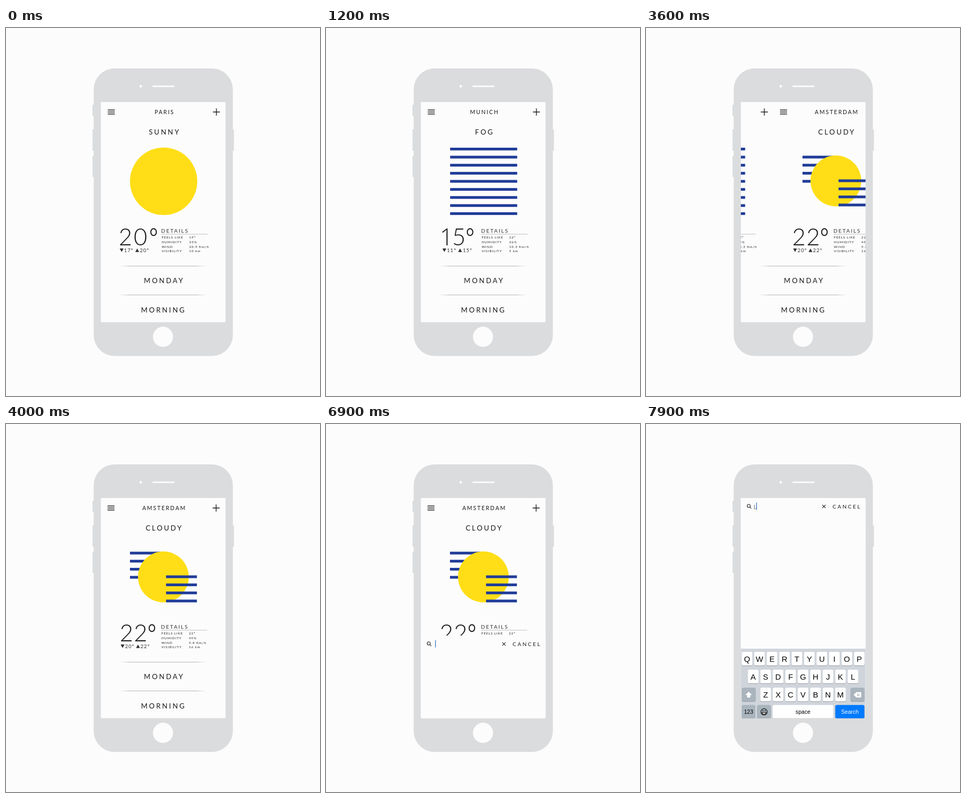
An HTML page that plays this animation: 600 px wide and 701 px high, repeating every 8000 ms.

```html
<!DOCTYPE html>
<html lang="en">
<head>
<meta charset="utf-8">
<title>Weather app</title>
<style>
  html, body { margin: 0; width: 100%; height: 100%; overflow: hidden; background: #fcfcfc; }
  svg { display: block; width: 100%; height: 100%; }
  text { font-family: Lato, "Open Sans", sans-serif; fill: #1a1a1a; white-space: pre; }
  .mid { text-anchor: middle; }
  .city { font-size: 10.5px; letter-spacing: 2px; }
  .title { font-size: 13.3px; letter-spacing: 3px; }
  .temp { font-size: 44.5px; font-weight: 300; }
  .one { font-family: "Open Sans", sans-serif; }
  .range { font-size: 9.6px; letter-spacing: 1px; fill: #333; }
  .head { font-size: 10px; letter-spacing: 2px; fill: #333; }
  .row { font-size: 6.3px; letter-spacing: .95px; fill: #222; }
  .cancel { font-size: 10.2px; letter-spacing: 2.6px; }
  .typed { font-size: 12.5px; font-weight: 300; }
  .key { font: 15px "Liberation Sans", Arial, sans-serif; text-anchor: middle; fill: #000; }
  .small { font-size: 10.6px; }
  .line { fill: none; stroke: #1a1a1a; stroke-width: 1.4; }
  .thin { stroke-width: 1.05; }
  .paper { fill: #fcfcfc; }
  .grey { fill: #dbdcde; }
  .sun { fill: #ffde17; }
  .bar { fill: #203c98; }
</style>
</head>
<body>
<svg viewBox="0 0 600 701">
  <defs>
    <clipPath id="screen"><rect x="181.3" y="141" width="238.2" height="419.6" rx="1.5"/></clipPath>
    <linearGradient id="fade">
      <stop offset="0" stop-color="#b4b4b4" stop-opacity="0"/>
      <stop offset=".12" stop-color="#b4b4b4"/>
      <stop offset=".88" stop-color="#b4b4b4"/>
      <stop offset="1" stop-color="#b4b4b4" stop-opacity="0"/>
    </linearGradient>
  </defs>

  <g class="grey">
    <rect x="165.3" y="146" width="5" height="22" rx="1"/>
    <rect x="165.3" y="193" width="5" height="41" rx="1"/>
    <rect x="165.3" y="243" width="5" height="40.5" rx="1"/>
    <rect x="430.5" y="193" width="5" height="41" rx="1"/>
    <rect x="167.5" y="77" width="266" height="547.7" rx="40"/>
  </g>
  <g class="paper">
    <circle cx="257.5" cy="111" r="2.5"/>
    <rect x="280" y="109.4" width="42" height="3.1" rx=".6"/>
    <circle cx="300" cy="588.3" r="19.2"/>
    <rect x="181.3" y="141" width="238.2" height="419.6" rx="1.5"/>
  </g>

  <g clip-path="url(#screen)">
    <g id="pages"></g>
    <g fill="url(#fade)">
      <rect x="217" y="453" width="166" height="1"/>
      <rect x="217" y="508" width="166" height="1"/>
    </g>
    <text class="title mid" x="302.3" y="486.4">MONDAY</text>
    <text class="title mid" x="301" y="541.5">MORNING</text>
    <circle id="tap" cx="402" cy="160" r="10" fill="#f0282d"/>

    <g id="panel">
      <rect class="paper" x="181" y="141" width="239" height="421"/>
      <g class="line thin">
        <circle cx="196.3" cy="155.9" r="3"/>
        <path d="M198.4 158.1l2.8 2.9M336.9 153.9l6.2 6.2M343.1 153.9l-6.2 6.2"/>
      </g>
      <text class="cancel" x="356.6" y="160.7">CANCEL</text>
      <text class="typed" id="typed" x="205.6" y="161.7">L</text>
      <rect id="caret" y="149.6" width="1.4" height="14" fill="#4a80c4"/>
    </g>
    <g id="keyboard"></g>
  </g>
</svg>

<script>
const $ = id => document.getElementById(id);
const PITCH = 238, LOOP = 8000, FRAME = 100;

const text = (cls, x, y, s) => `<text class="${cls}" x="${x}" y="${y}">${s}</text>`;
const rect = (cls, x, y, w, h) => `<rect class="${cls}" x="${x}" y="${y}" width="${w}" height="${h}"/>`;
const disc = (y, r) => `<circle class="sun" cx="301.2" cy="${y}" r="${r}"/>`;
const bars = (n, x, y, w) =>
  Array.from({ length: n }, (_, i) => rect("bar", x, y + i * 15.37, w, 5.2)).join("");

// tx: digit positions, deg: centre of the degree ring, rx: low mark, low text, high mark, high text
const places = [
  { city: "PARIS", sky: "SUNNY", art: disc(292, 64.3),
    temp: "20", tx: [215.3, 244], deg: 282, low: 17, high: 20, rx: [217.3, 225.6, 247, 255.8],
    facts: ["19°", "33%", "20.9 Km/h", "10 km"] },
  { city: "MUNICH", sky: "FOG", art: bars(9, 237.2, 228, 128.1),
    temp: "15", tx: [217.5, 241], deg: 275.3, low: 11, high: 15, rx: [222.5, 231, 252.5, 261.5],
    facts: ["22°", "36%", "10.3 Km/h", "5 km"] },
  { city: "AMSTERDAM", sky: "CLOUDY",
    art: bars(4, 237.4, 243.3, 59) + disc(291.2, 48.5) + bars(4, 306.3, 288.4, 59),
    temp: "22", tx: [217.7, 244.8], deg: 279.3, low: 20, high: 22, rx: [219.5, 228, 249, 257.5],
    facts: ["22°", "49%", "9.8 Km/h", "16 km"] }
];
const labels = ["FEELS LIKE", "HUMIDITY", "WIND", "VISIBILITY"];

function page(p, i) {
  const left = i * PITCH - (i === 2 ? .5 : 0);
  const [a, b, c, d] = p.rx;
  const digits = [...p.temp].map((n, k) =>
    text("temp" + (n === "1" ? " one" : ""), p.tx[k], 414, n)).join("");
  const rows = labels.map((s, k) => {
    const y = 401.3 + k * 8.6;
    return text("row", 297.4, y, s) + text("row", 350, y, p.facts[k]);
  }).join("");
  return `<g transform="translate(${left})">
    <path class="line" d="M194.4 156.3h13.5M194.4 160h13.5M194.4 163.8h13.5M395.3 160h13.4M402 153.3v13.4"/>
    ${text("city mid", 303, 163.7, p.city)}${text("title mid", 303.2, 203, p.sky)}
    ${p.art}${digits}
    <ellipse class="line" cx="${p.deg}" cy="388.8" rx="5.3" ry="6.5" style="stroke-width:2"/>
    <path fill="#333" d="M${a} 420h7.4l-3.7 6.8zM${c} 426.8h7.4l-3.7 -6.8z"/>
    ${text("range", b, 426.9, p.low + "º")}${text("range", d, 426.9, p.high + "º")}
    ${text("head", 296.6, 389.9, "DETAILS")}
    <rect x="297" y="392.4" width="88" height=".8" fill="#b0b0b0"/>
    ${rows}</g>`;
}
$("pages").innerHTML = places.map(page).join("");

function key(x, y, w, fill, label = "", cls = "", ink = "#000") {
  const box = (dy, f) => `<rect x="${x}" y="${y + dy}" width="${w}" height="26" rx="3" fill="${f}"/>`;
  const base = y + (cls ? 16.4 : 18.6);
  return box(1.1, "#999ea5") + box(0, fill) +
    `<text class="key ${cls}" x="${x + w / 2}" y="${base}" style="fill:${ink}">${label}</text>`;
}
const letters = (s, x, y) => [...s].map((c, i) => key(x + i * 23.83, y, 20.4, "#fff", c)).join("");
const DARK = "#a9b4bd";

$("keyboard").innerHTML = `
  <rect x="181" y="428" width="239" height="134" fill="#d0d5dc"/>
  ${letters("QWERTYUIOP", 182.9, 434)}
  ${letters("ASDFGHJKL", 194.6, 468)}
  ${letters("ZXCVBNM", 218.4, 502.2)}
  ${key(183, 502.2, 26.5, DARK)}${key(390.8, 502.2, 26.5, DARK)}
  ${key(183, 535.2, 26, DARK, "123", "small")}${key(212.5, 535.2, 26.2, DARK)}
  ${key(242, 535.2, 116, "#fff", "space", "small")}
  ${key(361.7, 535.2, 55.6, "#007aff", "Search", "small", "#fff")}
  <path fill="#fff" d="M196.2 510l6.4 6.3h-3.4v4.8h-6v-4.8h-3.4z"/>
  <path fill="#fff" d="M396.8 515.9l4.6-4.6q.5-.5 1.2-.5h7.3q1.4 0 1.4 1.4v7.4q0 1.4-1.4 1.4h-7.3q-.7 0-1.2-.5z"/>
  <path fill="none" stroke="${DARK}" stroke-width="1.1" d="M403.3 513.6l4.6 4.6M407.9 513.6l-4.6 4.6"/>
  <g class="line thin" style="stroke:#000"><circle cx="225.6" cy="548.3" r="6"/>
    <path fill="#fff" d="M221.6 549.4h8q-.6 3.4-4 3.4t-4-3.4z"/></g>
  <ellipse cx="223.5" cy="546.2" rx=".8" ry="1.3"/><ellipse cx="227.7" cy="546.2" rx=".8" ry="1.3"/>`;

const clamp = v => Math.min(1, Math.max(0, v));
const part = (t, a, b) => clamp((t - a) / (b - a));
// Smoothstep with a longer tail
function ease(u) {
  const s = 1 - (1 - u) ** 1.35;
  return s * s * (3 - 2 * s);
}
const move = (el, x, y) => el.setAttribute("transform", `translate(${x.toFixed(2)} ${y.toFixed(2)})`);
const show = (el, on) => el.setAttribute("visibility", on ? "visible" : "hidden");

function draw(t) {
  const slide = ease(part(t, 400, 1200)) + ease(part(t, 3100, 4000));
  move($("pages"), -PITCH * slide, 0);

  const glow = t < 6300 ? .13 + .27 * part(t, 6000, 6300) : .4 * (1 - part(t, 6300, 6700));
  $("tap").setAttribute("opacity", t < 6000 ? 0 : glow);

  move($("panel"), 0, 419.5 * (1 - ease(part(t, 6733, 7241))));
  show($("panel"), t > 6733);
  move($("keyboard"), 0, 134 * (1 - ease(part(t, 7240, 7850))));
  show($("keyboard"), t > 7240);

  const typed = t >= 7900;
  show($("typed"), typed);
  $("caret").setAttribute("x", typed ? 210.6 : 208.6);
  show($("caret"), (t > 6733 && t < 7200) || t >= 7800);
}

// The motion advances in steps of 100 ms
function tick() {
  draw(Math.floor(performance.now() % LOOP / FRAME) * FRAME);
  requestAnimationFrame(tick);
}
tick();
</script>
</body>
</html>
```
